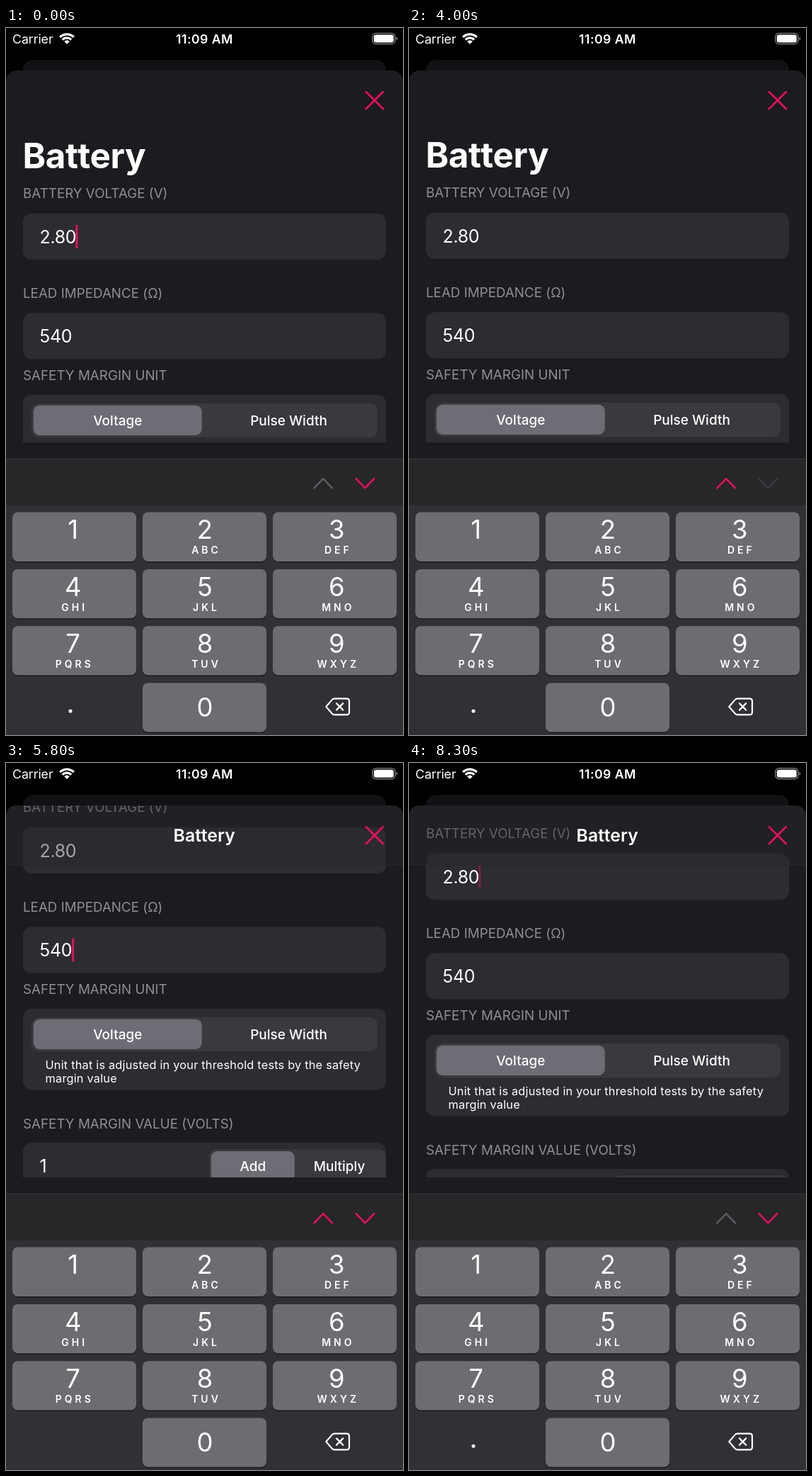
An HTML page for the animation above (8.8 s loop, 561 px wide and 998 px high).

```html
<!DOCTYPE html>
<html lang="en">
<head>
<meta charset="utf-8">
<title>Battery settings</title>
<style>
  html, body { margin: 0; width: 100%; height: 100%; overflow: hidden; background: #000; }
  svg { display: block; width: 100%; height: 100%; font-family: Inter, Roboto, sans-serif; fill: #fff; }
  .status { font-size: 17.8px; letter-spacing: -.1px; }
  .clock { font-size: 17.8px; font-weight: 600; letter-spacing: .4px; text-anchor: middle; }
  .large { font-size: 49.4px; font-weight: 700; letter-spacing: -.4px; }
  .title { font-size: 24.8px; font-weight: 600; text-anchor: middle; }
  .label { font-size: 18.8px; fill: #8f8e94; }
  .value { font-size: 25px; letter-spacing: -.4px; }
  .seg { font-size: 19px; font-weight: 500; text-anchor: middle; }
  .note { font-size: 16.4px; letter-spacing: .17px; }
  .digit { font-size: 36.5px; text-anchor: middle; }
  .letters { font-size: 14px; font-weight: 600; letter-spacing: 4px; text-anchor: middle; }
  .line { fill: none; stroke-linecap: round; stroke-linejoin: round; }
</style>
</head>
<body>
<svg id="stage" viewBox="0 0 561 998" xmlns="http://www.w3.org/2000/svg"></svg>
<script>
const LOOP = 8800, LAST = 8300, STEP = 100;
const PINK = '#e0125c', GREY = '#5c5b5f', CARD = '#2d2c31', TRACK = '#3a393e', THUMB = '#6e6d75';

const rect = (x, y, w, h, r, fill, extra = '') =>
  `<rect x="${x}" y="${y}" width="${w}" height="${h}" rx="${r}" fill="${fill}" ${extra}/>`;
const text = (x, y, cls, s, extra = '') =>
  `<text x="${x}" y="${y}" class="${cls}" ${extra}>${s}</text>`;
const line = (d, color, width, extra = '') =>
  `<path class="line" d="${d}" stroke="${color}" stroke-width="${width}" ${extra}/>`;
const cross = (x, y, r, color, width) =>
  line(`M${x - r} ${y - r}l${2 * r} ${2 * r}m0 ${-2 * r}l${-2 * r} ${2 * r}`, color, width);
const chevron = (x, y, rise, id) =>
  line(`M${x - 12.8} ${y + rise / 2}l12.8 ${-rise}l12.8 ${rise}`, PINK, 2.6, `id="${id}"`);

function statusBar() {
  const arc = r => {
    const d = r * Math.SQRT1_2;
    return `<path d="M${86 - d} ${22.7 - d}A${r} ${r} 0 0 1 ${86 + d} ${22.7 - d}" fill="none" stroke="#fff" stroke-width="3.3"/>`;
  };
  return text(9, 21.8, 'status', 'Carrier') +
    arc(13.9) + arc(8.8) + '<path d="M86 22.7l-3.8 -3.8a5.4 5.4 0 0 1 7.6 0z"/>' +
    text(280.5, 21.8, 'clock', '11:09 AM') +
    rect(517.8, 7.6, 32, 14.8, 5, 'none', 'stroke="#77767a" stroke-width="1.5"') +
    rect(519.8, 9.5, 28, 11, 3.2, '#fff') +
    '<path d="M551.4 12.4q2 .8 2 2.6t-2 2.6z" fill="#77767a"/>';
}

const card = (y, h) => rect(24, y, 513, h, 12, CARD);
const field = (y, value) => card(y, 65.3) + text(47.6, y + 42, 'value', value);

// Two-part switch whose left part is chosen.
function segments(x, y, w, thumb, left, right) {
  return rect(x, y, w, 48, 11, TRACK) + rect(x + 2.8, y + 2.7, thumb, 42.3, 9, THUMB) +
    text(x + 2.8 + thumb / 2, y + 30.8, 'seg', left) +
    text(x + (thumb + w) / 2, y + 30.8, 'seg', right);
}

function form() {
  return text(23.5, 198, 'large', 'Battery', 'id="large"') +
    text(24, 240, 'label', 'BATTERY VOLTAGE (V)') + field(261.7, '2.80') +
    text(24, 381.3, 'label', 'LEAD IMPEDANCE (Ω)') + field(402.2, '540') +
    text(24, 497.3, 'label', 'SAFETY MARGIN UNIT') + card(517.7, 114.8) +
    segments(36, 530, 489, 238, 'Voltage', 'Pulse Width') +
    text(55.5, 602.6, 'note', 'Unit that is adjusted in your threshold tests by the safety') +
    text(55.5, 621.8, 'note', 'margin value') +
    text(24, 686.6, 'label', 'SAFETY MARGIN VALUE (VOLTS)') + field(707, '1') +
    segments(287, 716.3, 250, 118, 'Add', 'Multiply') +
    rect(0, 0, 3, 33.5, 1.2, PINK, 'id="caret"');
}

function keypad() {
  const groups = ['', 'ABC', 'DEF', 'GHI', 'JKL', 'MNO', 'PQRS', 'TUV', 'WXYZ'];
  const top = row => 683.6 + row * 80.3;
  const center = col => 281 + (col - 1) * 186.3;
  const cap = (col, row) => {
    const x = 9 + col * 184;
    return rect(x, top(row) + 1.5, 175, 69.3, 7.5, '#1c1b1e') + rect(x, top(row), 175, 69.3, 7.5, '#6d6c71');
  };
  let out = rect(0, 674, 561, 324, 0, '#313034');
  groups.forEach((g, i) => {
    const col = i % 3, row = Math.floor(i / 3);
    out += cap(col, row) + text(center(col), top(row) + 37.7, 'digit', i + 1) +
      text(center(col) + 2, top(row) + 58.6, 'letters', g);
  });
  return out + cap(1, 3) + text(center(1), top(3) + 47, 'digit', 0) +
    '<circle id="dot" cx="91" cy="964.3" r="2.5"/>' +
    line('M452.3 958L460.6 948.4Q462 946.6 464.4 946.6H481.3Q485 946.6 485 950.3V965.7Q485 969.4 481.3 969.4H464.4Q462 969.4 460.6 967.6Z', '#fff', 2.2) +
    cross(471.6, 958, 4.6, '#fff', 2.2);
}

document.getElementById('stage').innerHTML =
  '<clipPath id="view"><path d="M0 585V75Q0 60 15 60H546Q561 60 561 75V585Z"/></clipPath>' +
  rect(0, 0, 561, 998, 0, '#000') + statusBar() +
  rect(24, 45, 513, 60, 14, '#121114') +
  rect(0, 60, 561, 600, 15, '#1c1b1f') +
  `<g clip-path="url(#view)"><g id="form">${form()}</g>` +
  '<g id="bar">' + rect(0, 60, 561, 84, 0, '#29282c', 'fill-opacity=".42"') +
  rect(0, 143.5, 561, 1, 0, '#2a292d') + text(280.2, 110.8, 'title', 'Battery') + '</g></g>' +
  cross(520.8, 102.1, 11.9, PINK, 2.8) +
  rect(0, 608, 561, 66, 0, '#272628') + rect(0, 607.7, 561, 1, 0, '#39383b') +
  chevron(448.2, 642.8, 13.3, 'up') + chevron(507.4, 642.7, -13.3, 'down') +
  keypad();

const el = {};
for (const id of ['form', 'large', 'bar', 'caret', 'up', 'down', 'dot']) el[id] = document.getElementById(id);

// Focus moves with each tap; the caret starts blinking once the form has settled.
const taps = [
  { time: 0, field: 0, settled: 0 },
  { time: 3500, field: 1, settled: 3500, arrow: 'down' },
  { time: 3900, field: 2, settled: 4300, arrow: 'down' },
  { time: 5500, field: 1, settled: 5500, arrow: 'up' },
  { time: 6300, field: 0, settled: 6700, arrow: 'up' }
];
const caretSpots = [[98.4, 277.8], [93.2, 418.3], [58, 723]];

const clamp = v => Math.min(1, Math.max(0, v));
function ease(t, from, to) {
  const u = clamp((t - from) / (to - from));
  return u * u * (3 - 2 * u);
}
const scrollAt = t => 171 * ease(t, 3985, 4310) - 37 * ease(t, 6385, 6700);

// One-second blink: fades out after the middle, back in at the end.
function blink(age) {
  const p = Math.max(0, age) % 1000;
  return p < 800 ? clamp((700 - p) / 240) : (p - 800) / 200;
}

function draw(ms) {
  const t = Math.min(LAST, Math.floor(ms % LOOP / STEP) * STEP);
  const scroll = scrollAt(t), collapsed = scroll >= 60;
  const { field, settled } = taps.filter(tap => tap.time <= t).pop();
  const pressed = id => taps.some(tap => tap.arrow === id && t >= tap.time - 100 && t < tap.time + 200);
  const [x, y] = caretSpots[field];
  const set = (id, name, value) => el[id].setAttribute(name, value);
  const show = (id, on) => set(id, 'visibility', on ? 'visible' : 'hidden');

  set('form', 'transform', `translate(0 ${-scroll})`);
  show('large', !collapsed);
  show('bar', collapsed);
  show('dot', field !== 1);
  set('caret', 'x', x);
  set('caret', 'y', y);
  set('caret', 'opacity', blink(t - settled));
  set('up', 'stroke', field > 0 ? PINK : GREY);
  set('down', 'stroke', field < 2 ? PINK : GREY);
  // Only the arrow that ran out of fields stays dim while held.
  set('up', 'opacity', pressed('up') && field === 0 ? .4 : 1);
  set('down', 'opacity', pressed('down') && field === 2 ? .4 : 1);
}

const start = performance.now();
function tick() {
  draw(performance.now() - start);
  requestAnimationFrame(tick);
}
tick();
</script>
</body>
</html>
```
